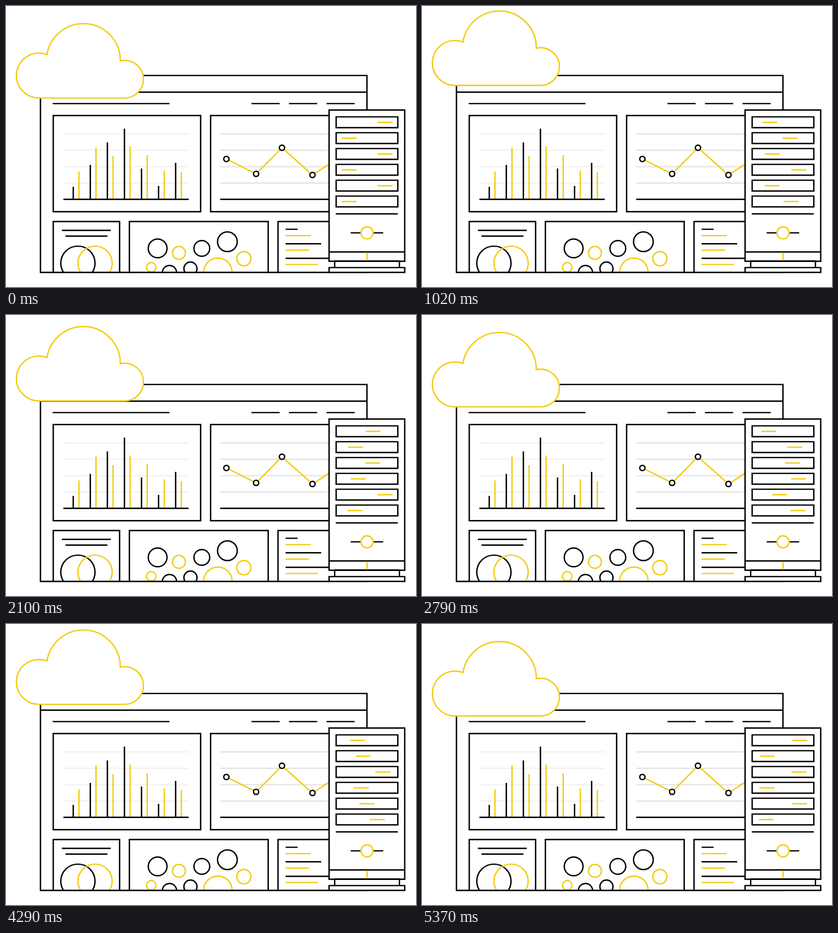
Animation, 800 px wide and 550 px high, one loop 5400 ms. Source, as an HTML page:

```html
<!DOCTYPE html>
<html lang="en">
<head>
<meta charset="utf-8">
<title>Cloud dashboard</title>
<style>
  html, body { margin: 0; width: 100%; height: 100%; overflow: hidden; background: #fff; }
  svg { display: block; width: 800px; height: 550px; fill: none; stroke: #000; stroke-width: 2.7; }
  .y { stroke: #f2cd13; }
  .w { fill: #fff; }
  .faint { stroke: #f2f2f2; }
  .grid { stroke: #e5e5e5; }
</style>
</head>
<body>
<svg viewBox="0 0 800 550">
  <defs>
    <clipPath id="inside"><rect x="67" y="136" width="638" height="385"/></clipPath>
    <marker id="dot" markerUnits="userSpaceOnUse" markerWidth="14" markerHeight="14" refX="7" refY="7">
      <circle class="w" cx="7" cy="7" r="5.1"/>
    </marker>
  </defs>

  <!-- window -->
  <path d="M67.2 136H704.3V521.3H67.2ZM67 168.7H704M91 191H319"/>
  <g id="menu"></g>

  <!-- charts -->
  <path d="M92.2 214.3H379.8V402.7H92.2ZM399.2 214.3H686V402.7H399.2Z"/>
  <g id="grids"></g>
  <g id="bars"></g>
  <path d="M112 378.4H356.5M418 378.4H662"/>
  <polyline class="y" points="430,299.4 488,328.6 538.5,277.4 598,330.8 645,300"
    marker-start="url(#dot)" marker-mid="url(#dot)"/>

  <!-- lower panels -->
  <path d="M92.2 521V421.8H221.7V521M240.8 521V421.8H511.6V521M530.8 521V421.8H686V521"/>
  <path d="M109 439.2H204.5M116 450.4H198"/>
  <g clip-path="url(#inside)">
    <circle cx="140.3" cy="503.4" r="33.4"/>
    <circle cx="295.9" cy="474.4" r="18.3"/>
    <circle cx="382.1" cy="474.5" r="15.4"/>
    <circle cx="432" cy="461.4" r="19.2"/>
    <circle cx="319" cy="521.6" r="13.8"/>
    <circle cx="359.9" cy="514" r="12.8"/>
    <g class="y">
      <circle cx="173.8" cy="503.4" r="33.4"/>
      <circle cx="337.4" cy="483.2" r="12.6"/>
      <circle cx="464.1" cy="494.6" r="13.9"/>
      <circle cx="283.3" cy="511.4" r="9.2"/>
      <circle cx="413.4" cy="521.2" r="27.8"/>
    </g>
  </g>
  <path d="M545.5 437H569M545.5 465.3H615M545.5 493.8H640"/>
  <path class="y" d="M545.5 449.5H595M545.5 477.8H591M545.5 506H609"/>
  <path d="M67 521.3H704"/>

  <!-- server -->
  <path class="w" d="M641.3 499H767.7V512H641.3ZM630.4 512H778V521.3H630.4ZM630.4 203.6H778V499.6H630.4Z"/>
  <path d="M630 481.3H778M643.5 406.8H764.5M672.5 444H736"/>
  <path class="y" d="M704.4 482.6V498.2"/>
  <circle class="y w" cx="704.4" cy="444" r="11.8"/>
  <g id="slots"></g>

  <path id="cloud" class="y w" d="M64.3 180A44 44 0 0 1 20.3 136A44 44 0 0 1 79.9 95
    A72 72 0 0 1 151 34.5A72 72 0 0 1 223 107.3A36.8 36.8 0 0 1 268.1 143.2A36.8 36.8 0 0 1 231.3 180Z"/>
</svg>
<script>
const LOOP = 5400, STEP = 30, LEGS = 6;
const LEFT = 655, RIGHT = 725;
const $ = id => document.getElementById(id);

function line(parent, d, className = '') {
  const path = document.createElementNS('http://www.w3.org/2000/svg', 'path');
  path.setAttribute('d', d);
  path.setAttribute('class', className);
  return $(parent).appendChild(path);
}
const shift = (el, x, y) => el.setAttribute('transform', `translate(${x} ${y})`);

for (let i = 0; i < 3; i++) line('menu', `M${479 + i * 73.2} 191h55`);

for (let i = 0; i < 4; i++) {
  const y = 250.3 + i * 32.1;
  line('grids', `M112 ${y}h244`, 'faint');
  line('grids', `M418 ${y}h244`, 'grid');
}

function bars(heights, x, className) {
  heights.forEach((h, i) => line('bars', `M${x + i * 33.3} 378v${-h}`, className));
}
bars([24, 67, 111, 138, 60, 26, 71], 131.2);
bars([54, 101, 84, 103, 86, 56, 53], 142.3, 'y');

// Each light crosses its slot six times; a few sine waves make the pace uneven.
const sways = [[], [230, -250, -50, -140], [850, 0, -50], [270, -145, 110, 80], [375, -90, -195, -60], [35, 0, -135, -140]];

function turnTime(sway, leg) {
  const u = leg / LEGS;
  return sway.reduce((t, size, i) => t + size * Math.sin(Math.PI * (i + 1) * u), LOOP * u);
}

function lightX(row, t) {
  const sway = sways[row];
  let leg = 0;
  while (leg < LEGS - 1 && t >= turnTime(sway, leg + 1)) leg++;
  const start = turnTime(sway, leg);
  const p = (t - start) / (turnTime(sway, leg + 1) - start);
  const rightward = (row + leg) % 2;
  return LEFT + (RIGHT - LEFT) * (rightward ? p : 1 - p);
}

const lights = sways.map((_, row) => {
  const y = 217 + row * 31;
  line('slots', `M644.2 ${y}h120.3v21.2h-120.3z`);
  return line('slots', `M0 ${y + 10.8}h29`, 'y');
});

// Two rises per loop, the first one higher
function cloudY(t) {
  const half = LOOP / 2;
  const height = t < half ? 28.6 : 24.6;
  return -height * (1 - Math.cos(2 * Math.PI * t / half)) / 2;
}

function draw(t) {
  shift($('cloud'), 0, cloudY(t));
  lights.forEach((light, row) => shift(light, lightX(row, t), 0));
}

const began = performance.now();
function tick() {
  const t = (performance.now() - began) % LOOP;
  draw(Math.floor(t / STEP) * STEP);
  requestAnimationFrame(tick);
}
tick();
</script>
</body>
</html>
```
